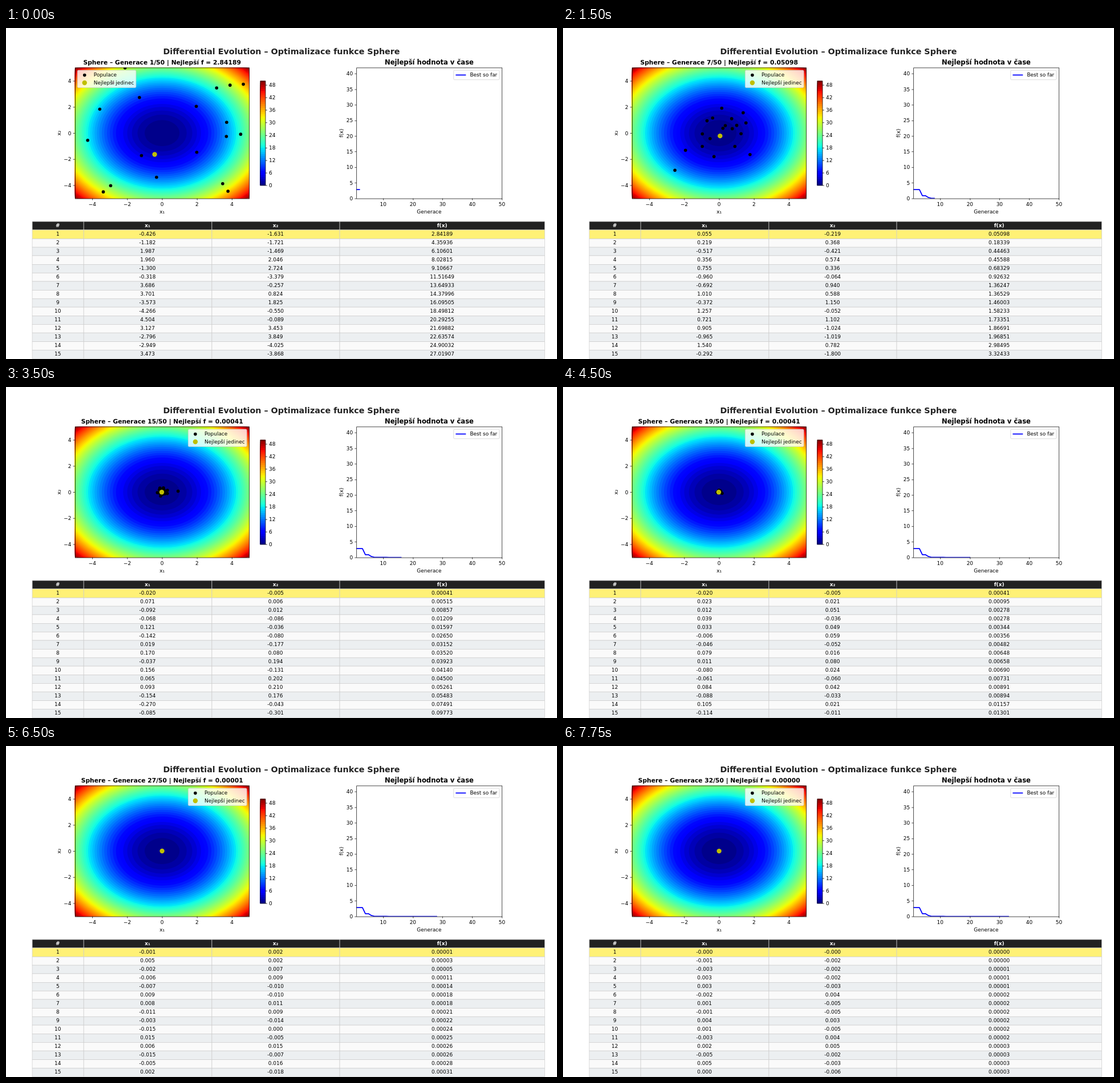
These frames come from a looping animation (966x580 px, 8 s). An HTML page with a canvas:

```html
<!DOCTYPE html>
<html lang="cs">
<head>
<meta charset="utf-8">
<title>Differential Evolution</title>
<style>
html, body { margin: 0; width: 100%; height: 100%; overflow: hidden; background: #fff; }
canvas { display: block; }
</style>
</head>
<body>
<canvas id="stage" width="966" height="580"></canvas>
<script>
const ctx = document.getElementById('stage').getContext('2d');
const STEP = 250, LAST_GEN = 32, ROWS = 15, POP_SIZE = 20;
const SCALE = 966 / 1500;          // layout grid unit in stage pixels
const PT = SCALE * 100 / 72, EM = 10 * PT;
const FAMILY = '"DejaVu Sans", sans-serif';

// ---------- population ----------
// Generations in which a new best member appears.
const LEADERS = [
  { gen: 1, x: -0.426, y: -1.631, f: 2.84189 },
  { gen: 3, x: -0.033, y: -0.940, f: 0.885 },
  { gen: 5, x: 0.535, y: -0.160, f: 0.31209 },
  { gen: 6, x: 0.055, y: -0.219, f: 0.05098 },
  { gen: 11, x: -0.033, y: -0.113, f: 0.01396 },
  { gen: 15, x: -0.020, y: -0.005, f: 0.00041 },
  { gen: 22, x: -0.0001, y: -0.006, f: 0.00004 },
  { gen: 27, x: -0.001, y: 0.002, f: 0.00001 },
  { gen: 32, x: -0.0001, y: -0.0001, f: 0 }
];

const random = (a, b) => {
  const v = Math.sin(a * 12.9898 + b * 78.233) * 43758.5453;
  return v - Math.floor(v);
};
const leaderAt = gen => LEADERS.findLast(m => m.gen <= gen);
const lastRowValue = gen => 26.6 * Math.exp(-0.441 * (gen - 1));

// A slot keeps its member until a later generation replaces it.
function birthOf(slot, gen) {
  while (gen > 1 && random(slot, gen) > 0.6) gen--;
  return gen;
}

function memberAt(slot, gen) {
  const born = birthOf(slot, gen);
  const best = leaderAt(born).f;
  const rank = (slot + 0.8 * random(slot + 31, born) - 0.4) / (ROWS - 1);
  const f = best + (lastRowValue(born) - best) * rank;
  const r = Math.sqrt(f);
  const margin = r > 5 ? Math.acos(5 / r) : 0;   // stay inside the square domain
  const quarter = Math.PI / 2;
  const angle = (slot + born) % 4 * quarter + margin
    + random(slot + 57, born) * (quarter - 2 * margin);
  return { x: r * Math.cos(angle), y: r * Math.sin(angle), f };
}

function populationAt(gen) {
  const members = [leaderAt(gen)];
  for (let slot = 1; slot < POP_SIZE; slot++) members.push(memberAt(slot, gen));
  return members.sort((a, b) => a.f - b.f);
}

// ---------- drawing helpers ----------
const snap = v => (Math.round(v / SCALE) + 0.5) * SCALE;
const range = (from, to, step) =>
  Array.from({ length: Math.floor((to - from) / step) + 1 }, (_, i) => from + i * step);

function text(str, x, y, { size = 10, bold = false, align = 'center', color = '#000' } = {}) {
  ctx.font = `${bold ? 'bold ' : ''}${size * PT}px ${FAMILY}`;
  ctx.textAlign = align;
  ctx.fillStyle = color;
  ctx.fillText(str, x, y);
}

function verticalText(str, x, y) {
  ctx.save();
  ctx.translate(x, y);
  ctx.rotate(-Math.PI / 2);
  text(str, 0, 0);
  ctx.restore();
}

function line(x1, y1, x2, y2, color = '#000', width = 0.8 * PT) {
  ctx.strokeStyle = color;
  ctx.lineWidth = width;
  ctx.lineCap = 'butt';
  ctx.beginPath();
  ctx.moveTo(x1, y1);
  ctx.lineTo(x2, y2);
  ctx.stroke();
}

function outline({ l, t, r, b }, color = '#000', width = 0.8 * PT) {
  ctx.strokeStyle = color;
  ctx.lineWidth = width;
  ctx.lineJoin = 'miter';
  ctx.strokeRect(snap(l), snap(t), snap(r) - snap(l), snap(b) - snap(t));
}

function dot(x, y, radius, color) {
  ctx.fillStyle = color;
  ctx.beginPath();
  ctx.arc(x, y, radius, 0, 2 * Math.PI);
  ctx.fill();
}

function clipTo({ l, t, r, b }, draw) {
  ctx.save();
  ctx.beginPath();
  ctx.rect(l, t, r - l, b - t);
  ctx.clip();
  draw();
  ctx.restore();
}

const minus = v => String(v).replace('-', '−');
const TICK = 3.5 * PT;

function xTicks(box, values, toX) {
  for (const v of values) {
    const x = toX(v);
    line(snap(x), box.b, snap(x), box.b + TICK);
    text(minus(v), x, box.b + 13.2);
  }
}

function yTicks(edge, values, toY, dir = -1) {
  for (const v of values) {
    const y = toY(v);
    line(edge, snap(y), edge + dir * TICK, snap(y));
    text(minus(v), edge + dir * 2 * TICK, y + 3.4, { align: dir > 0 ? 'left' : 'right' });
  }
}

function legendBox(x, y, w, h) {
  ctx.beginPath();
  ctx.roundRect(x, y, w, h, 1.8);
  ctx.fillStyle = 'rgba(255,255,255,0.8)';
  ctx.fill();
  ctx.strokeStyle = 'rgba(204,204,204,0.8)';
  ctx.lineWidth = PT;
  ctx.stroke();
}

function jet(t) {
  const ramp = c => Math.round(255 * Math.max(0, Math.min(1, c)));
  const r = t < 0.89 ? (t - 0.35) / 0.31 : 1 - (t - 0.89) / 0.22;
  const g = t < 0.5 ? (t - 0.125) / 0.25 : 1 - (t - 0.64) / 0.27;
  const b = t < 0.2 ? 0.5 + t / 0.22 : 1 - (t - 0.34) / 0.31;
  return `rgb(${ramp(r)},${ramp(g)},${ramp(b)})`;
}

// ---------- panels ----------
const TOP = 69.6, BOTTOM = 298.63, MIDDLE = (TOP + BOTTOM) / 2, TITLE_Y = 64.2;
const BANDS = 50;

const map = { l: 120.75, t: TOP, r: 426.58, b: BOTTOM };
const unitX = (map.r - map.l) / 10, unitY = (BOTTOM - TOP) / 10;
const mapX = v => (map.l + map.r) / 2 + v * unitX;
const mapY = v => MIDDLE - v * unitY;

function drawMap(gen, members) {
  clipTo(map, () => {
    for (let i = BANDS; i > 0; i--) {
      const r = Math.sqrt(i) + (i === BANDS ? 0.1 : 0);
      ctx.fillStyle = jet((i - 0.5) / BANDS);
      ctx.beginPath();
      ctx.ellipse(mapX(0), mapY(0), r * unitX, r * unitY, 0, 0, 2 * Math.PI);
      ctx.fill();
    }
    for (const m of members) dot(mapX(m.x), mapY(m.y), 2.8, '#000');
    dot(mapX(members[0].x), mapY(members[0].y), 4.2, '#bfbf00');
  });
  outline(map);
  xTicks(map, range(-4, 4, 2), mapX);
  yTicks(map.l, range(-4, 4, 2), mapY);
  text('x₁', mapX(0), 325);
  verticalText('x₂', 95.8, MIDDLE);
  text(`Sphere – Generace ${gen}/50 | Nejlepší f = ${members[0].f.toFixed(5)}`, mapX(0), TITLE_Y,
    { size: 12, bold: true });
  drawMapLegend(members);
}

// The legend takes the upper right corner unless a member lies beneath it.
function drawMapLegend(members) {
  const w = 102.7, h = 30.4, gap = EM / 2, top = TOP + gap, rightX = map.r - gap - w;
  const covered = members.some(m => mapX(m.x) > rightX && mapY(m.y) < top + h);
  const x = covered ? map.l + gap : rightX;
  legendBox(x, top, w, h);
  dot(x + 1.4 * EM, 82.6, 2.8, '#000');
  dot(x + 1.4 * EM, 96, 4.2, '#bfbf00');
  text('Populace', x + 3.2 * EM, 85.2, { align: 'left' });
  text('Nejlepší jedinec', x + 3.2 * EM, 98.7, { align: 'left' });
}

function drawColorbar() {
  const bar = { l: 445.69, t: 92.5, r: 454.84, b: 275.73 };
  const toY = v => bar.b - v * (bar.b - bar.t) / BANDS;
  for (let i = BANDS; i > 0; i--) {
    ctx.fillStyle = jet((i - 0.5) / BANDS);
    ctx.fillRect(bar.l, toY(i), bar.r - bar.l, bar.b - toY(i));
  }
  outline(bar);
  yTicks(bar.r, range(0, 48, 6), toY, 1);
}

const chart = { l: 614.49, t: TOP, r: 869.4, b: BOTTOM };
const chartX = gen => chart.l + (gen - 1) * (chart.r - chart.l) / 49;
const chartY = f => BOTTOM - f * 5.466;

function drawChart(gen) {
  clipTo(chart, () => {
    ctx.beginPath();
    ctx.moveTo(chartX(1), chartY(leaderAt(1).f));
    for (let g = 1; g <= gen; g++) ctx.lineTo(chartX(g + 1), chartY(leaderAt(g).f));
    ctx.strokeStyle = '#00f';
    ctx.lineWidth = 2 * PT;
    ctx.lineCap = 'square';
    ctx.lineJoin = 'round';
    ctx.stroke();
  });
  outline(chart);
  xTicks(chart, range(10, 50, 10), chartX);
  yTicks(chart.l, range(0, 40, 5), chartY);
  const center = (chart.l + chart.r) / 2;
  text('Generace', center, 325);
  verticalText('f(x)', 591, MIDDLE);
  text('Nejlepší hodnota v čase', center, TITLE_Y, { size: 13, bold: true });
  legendBox(784.8, TOP + EM / 2, 80.1, 16.6);
  line(788.4, 82.4, 806.3, 82.4, '#00f', 2 * PT);
  text('Best so far', 813.4, 85.3, { align: 'left' });
}

const table = { l: 45.89, t: 338.73, w: 898.38, rowH: 16.8 * PT };
const COLUMN_STOPS = [0, 0.1, 0.35, 0.6, 1];

function drawTable(members) {
  const header = ['#', 'x₁', 'x₂', 'f(x)'];
  for (let row = 0; row <= ROWS; row++) {
    const m = members[row - 1], t = table.t + row * table.rowH, b = t + table.rowH;
    const cells = row ? [row, m.x.toFixed(3), m.y.toFixed(3), m.f.toFixed(5)] : header;
    const fill = row === 0 ? '#212121' : row === 1 ? '#fff176' : row % 2 ? '#eceff1' : '#fafafa';
    cells.forEach((cell, c) => {
      const [l, r] = [c, c + 1].map(i => table.l + COLUMN_STOPS[i] * table.w);
      ctx.fillStyle = fill;
      ctx.fillRect(snap(l), snap(t), snap(r) - snap(l), snap(b) - snap(t));
      outline({ l, t, r, b }, '#ccc', 0.7);
      text(cell, (l + r) / 2, (t + b) / 2 + 2.6, { bold: !row, color: row ? '#000' : '#fff' });
    });
  }
}

function render(gen) {
  const members = populationAt(gen);
  ctx.clearRect(0, 0, 966, 580);
  drawColorbar();
  drawMap(gen, members);
  drawChart(gen);
  drawTable(members);
  text('Differential Evolution – Optimalizace funkce Sphere', 483, 45.8,
    { size: 16, bold: true, color: '#222' });
}

let shown = 0;
function tick() {
  const gen = Math.floor(performance.now() / STEP) % LAST_GEN + 1;
  if (gen !== shown) render(shown = gen);
  requestAnimationFrame(tick);
}
tick();
</script>
</body>
</html>
```
